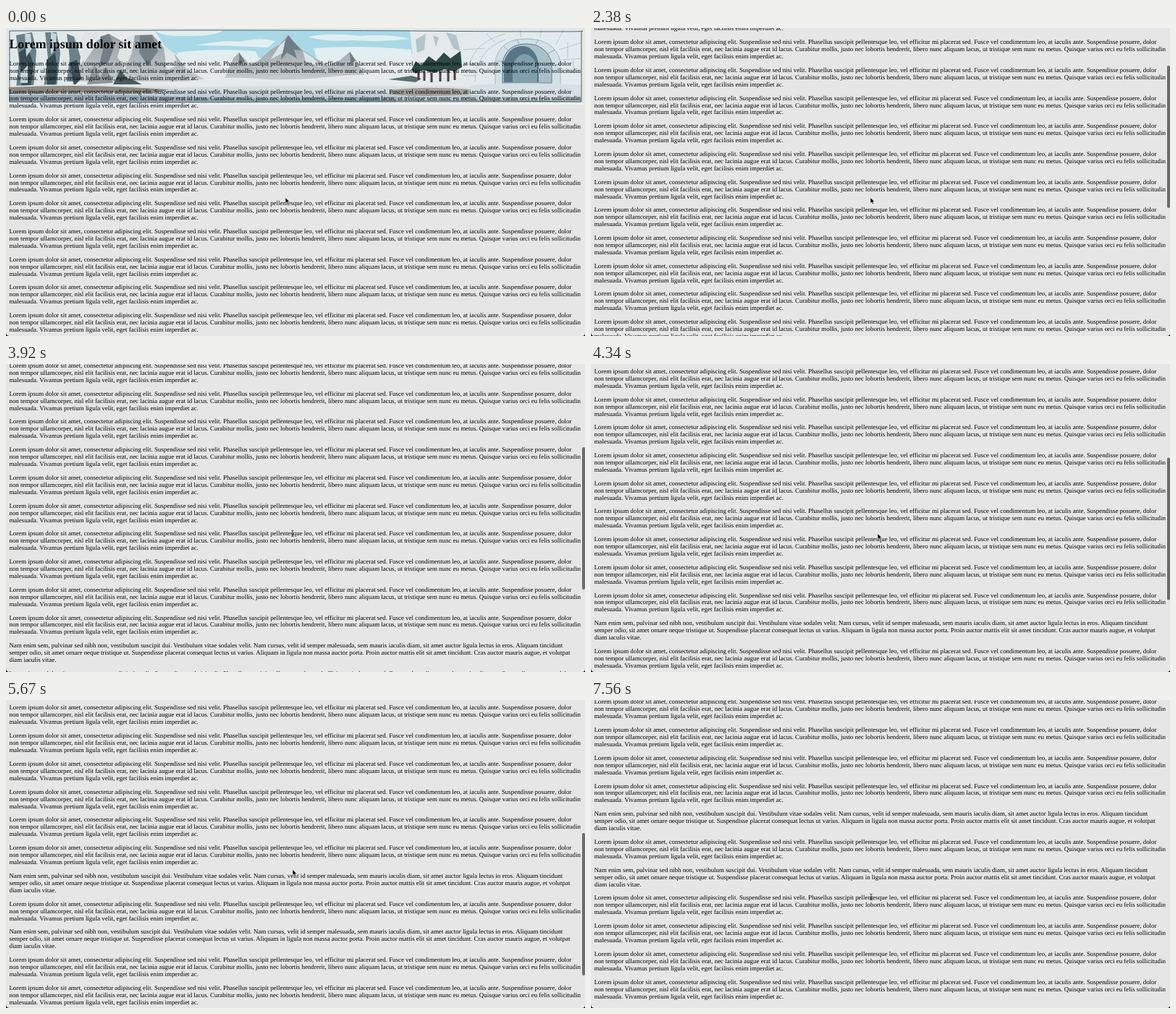
These frames come from a looping animation (800x426 px, 7630 ms). An HTML page:

```html
<!DOCTYPE html>
<html lang="la">
<head>
<meta charset="utf-8">
<title>Lorem ipsum</title>
<style>
html, body { margin: 0; width: 100%; height: 100%; overflow: hidden; background: #e6e6e6; }
#stage { position: relative; width: 800px; height: 426px; overflow: hidden; }
#stage svg { position: absolute; left: 0; top: 0; }
#scroll { position: absolute; left: 0; top: 0; width: 800px; height: 900px; }
#page {
  position: absolute; left: 0; top: 0; width: 1440px;
  transform: scale(.5556); transform-origin: 0 0;
  font: 16px/17.9px "Liberation Serif", Times, serif;
  text-rendering: geometricPrecision; white-space: pre; color: #000;
}
h1 { margin: 21.44px 8px; font-size: 32px; line-height: 37px; }
p { margin: 0 8px 15.98px; }
#thumb {
  position: absolute; left: 796px; top: 0; width: 4px; height: 197px;
  border-radius: 2px; background: #6c6c6c;
}
</style>
</head>
<body>
<div id="stage">
  <div id="scroll">
    <svg id="banner" width="800" height="110">
      <defs>
        <clipPath id="frame"><rect x="4" y="3" width="791" height="100"/></clipPath>
        <linearGradient id="shore" x2="0" y2="1">
          <stop stop-color="#dfe5e7"/><stop offset="1" stop-color="#aebdc5"/>
        </linearGradient>
        <linearGradient id="stone" x2="0" y2="1">
          <stop stop-color="#929ca2"/><stop offset="1" stop-color="#c6cccf"/>
        </linearGradient>
      </defs>
      <path d="M4 102H796V106H4Z" fill="#f3f5f5"/>
      <g clip-path="url(#frame)">
        <rect width="800" height="110" fill="#e6eaeb"/>
        <!-- sky and clouds -->
        <path d="M205 3H562V36Q520 44 480 40L300 42L240 40L220 26Z" fill="#a9d9e7"/>
        <g fill="#e2eef1">
          <path d="M205 3H300Q290 12 245 11Q215 12 205 3Z"/>
          <path d="M262 24Q300 16 325 19Q350 12 372 18L362 27Q310 24 262 24Z"/>
          <path d="M418 12Q450 6 490 11Q530 8 558 15Q520 20 480 17Q440 20 418 12Z"/>
          <path d="M236 34Q290 27 345 32L350 44H240Z"/>
          <path d="M425 28Q490 23 560 30V44H430Z"/>
        </g>
        <!-- mountains -->
        <path d="M95 62L125 18L142 8L160 18L178 10L202 9L218 27L232 35L250 57L280 74H90Z" fill="url(#stone)"/>
        <path d="M130 12L142 8L150 24L142 46L128 55L134 30ZM185 10H202L210 32L196 52L184 34Z" fill="#747f86"/>
        <path d="M108 5L128 6L124 24L108 48L100 30ZM160 18L178 10L174 34L164 58L154 40ZM218 27L232 35L238 51L222 59Z" fill="#dfe5e7"/>
        <path d="M300 74L314 42L322 34L338 52L350 44L366 30L378 23L390 10L398 19L410 31L425 40L444 52L462 44L475 33L486 48L500 74Z" fill="url(#stone)"/>
        <path d="M390 10L398 20L408 31L398 30L402 42L388 34L380 44L382 26ZM475 33L483 45L476 49ZM322 34L330 46L322 51Z" fill="#707d85"/>
        <path d="M378 24L386 17L382 35L366 43ZM410 32L424 41L436 54L414 46Z" fill="#dce3e6"/>
        <!-- snow field -->
        <path d="M230 76Q300 66 345 70T440 68T560 66V84H230Z" fill="#e6eaeb"/>
        <!-- left cliff and trees -->
        <path d="M4 3H98L105 34L90 70L80 82H4Z" fill="#e0e8ea"/>
        <path d="M14 10L36 6L42 32L38 82H14L18 46ZM54 6H70L75 34L70 82H52L58 42ZM84 8L94 12L103 40L98 74H84L88 42Z" fill="#6b8089"/>
        <path d="M18 34L30 26L38 50L34 82H22ZM56 44L68 34L71 58L68 82H57ZM88 48L98 44L104 70L94 80Z" fill="#3a4d55"/>
        <path d="M26 8L34 8L36 28L28 40ZM62 6L70 8L68 30L62 36ZM20 62L30 52V76H20Z" fill="#c5d6db"/>
        <path d="M112 78L122 50L130 68L138 54L148 76Z" fill="#8b959a"/>
        <path d="M150 74L158 58L166 68L178 73L188 78H148Z" fill="#4c5b60"/>
        <!-- shore -->
        <path d="M4 80Q120 75 240 82Q400 78 560 80T800 78V104H4Z" fill="url(#shore)"/>
        <path d="M4 82Q90 78 170 82L225 85L205 90Q100 88 4 91Z" fill="#8d8882"/>
        <path d="M4 93Q120 90 240 95T540 95V103H4Z" fill="#9aabb5"/>
        <path d="M530 86Q580 80 640 85V92Q580 96 530 92Z" fill="#a39f9a"/>
        <!-- right cliff and trees -->
        <path d="M558 3H660L650 60L632 80H556L570 54L562 38Z" fill="#e4e9eb"/>
        <path d="M566 16L580 8L578 30L568 34ZM608 6L622 10L628 32L618 28ZM590 10L598 13L594 26Z" fill="#b4c4cb"/>
        <path d="M528 71L560 66L574 70L566 75Z" fill="#5b706d"/>
        <path d="M560 58L566 46L574 52L584 39L594 46L605 34L614 42L628 32L630 54L620 60L606 57L592 62L576 58L566 63Z" fill="#2d4a46"/>
        <path d="M570 60V72M578 60V73M588 62V75M600 60V74M611 58V74M620 58V72" stroke="#4e3f3c" stroke-width="3"/>
        <!-- igloo -->
        <path d="M632 82Q628 16 672 3H800V82Z" fill="#e3eaed"/>
        <path d="M640 50Q650 18 690 8M648 74Q650 30 690 16M632 30L662 28M632 50L654 50M632 66L650 66M664 8L676 20M710 3L712 13M740 3L738 13M770 3L760 23M796 20L764 30M796 42L768 44M796 62L768 60M776 20V42M784 43V62" fill="none" stroke="#b6c6cd"/>
        <path d="M676 80V46Q682 15 718 15Q758 15 766 46V80Z" fill="#d3e0e5" stroke="#9fb4be"/>
        <path d="M686 76V48Q691 22 719 22Q746 22 754 48V76Z" fill="#a9c0cb" stroke="#5d7a88"/>
        <path d="M688 75V48Q694 25 715 25Q732 27 736 50V75Z" fill="#587688"/>
        <path d="M700 75V52Q706 36 718 36Q732 40 734 56V75Z" fill="#7f9fae"/>
        <path d="M678 46L688 46M688 26L696 33M706 16L710 24M736 16L731 24M758 30L748 36M765 50L753 52" stroke="#8fa7b2"/>
        <path d="M640 80Q700 73 796 79V94Q700 99 640 92Z" fill="#d6e0e4"/>
      </g>
      <path d="M5 102V4Q300 2 560 4T795 4V102Q600 100 400 102T5 102Z" fill="none" stroke="#4b6570"/>
    </svg>
    <div id="page"><h1>Lorem ipsum dolor sit amet</h1></div>
  </div>
  <div id="thumb"></div>
  <svg width="800" height="426">
    <path d="M0 421Q0 426 5 426H0ZM800 422Q800 426 796 426H800Z"/>
    <g id="cursor">
      <path id="arrow" d="M0 0V8L1.9 6.3L3.2 9.1L4.6 8.5L3.4 5.8H5.8Z" stroke="#fff" stroke-width=".6"/>
      <path id="beam" d="M-1.6 -4.2Q0 -4.2 0 -3Q0 -4.2 1.6 -4.2M0 -3V3.4M-1.6 4.2Q0 4.2 0 3Q0 4.2 1.6 4.2M-1 1.5H1" fill="none" stroke="#222" stroke-width=".8"/>
    </g>
  </svg>
</div>
<script>
const LOOP = 7630, PITCH = 38.71, TOP = 44.4;
const $ = id => document.getElementById(id);

const lorem = `Lorem ipsum dolor sit amet, consectetur adipiscing elit. Suspendisse sed nisi velit. Phasellus suscipit pellentesque leo, vel efficitur mi placerat sed. Fusce vel condimentum leo, at iaculis ante. Suspendisse posuere, dolor
non tempor ullamcorper, nisl elit facilisis erat, nec lacinia augue erat id lacus. Curabitur mollis, justo nec lobortis hendrerit, libero nunc aliquam lacus, ut tristique sem nunc eu metus. Quisque varius orci eu felis sollicitudin
malesuada. Vivamus pretium ligula velit, eget facilisis enim imperdiet ac.`;
const nam = `Nam enim sem, pulvinar sed nibh non, vestibulum suscipit dui. Vestibulum vitae sodales velit. Nam cursus, velit id semper malesuada, sem mauris iaculis diam, sit amet auctor ligula lectus in eros. Aliquam tincidunt
semper odio, sit amet ornare neque tristique ut. Suspendisse placerat consequat lectus ut varius. Aliquam in ligula non massa auctor porta. Proin auctor mattis elit sit amet tincidunt. Cras auctor mauris augue, et volutpat
diam iaculis vitae.`;

for (let i = 0; i < 22; i++) {
  const p = document.createElement('p');
  p.textContent = i === 15 || i === 17 ? nam : lorem;
  $('page').append(p);
}

// Scroll offset: time in ms, pixels
const keys = [[1780, 0], [2380, 107], [3130, 163], [3270, 163], [3920, 240.3],
              [4970, 314.1], [5670, 386.5], [6400, 472]];
const clamp = x => Math.min(1, Math.max(0, x));
const ramp = (t, a, b) => clamp((t - a) / (b - a));
const smooth = x => x * x * (3 - 2 * x);
const rate = i => keys[i + 1] && keys[i] ? (keys[i + 1][1] - keys[i][1]) / (keys[i + 1][0] - keys[i][0]) : 0;

// Harmonic mean of the neighbouring rates keeps the curve monotone
function slope(i) {
  const a = rate(i - 1), b = rate(i);
  return a && b ? 2 * a * b / (a + b) : 0;
}

function scrollAt(t) {
  const i = keys.findIndex(k => k[0] > t) - 1;
  if (i === -1) return 0;
  if (i < -1) return keys[keys.length - 1][1];
  const [t0, y0] = keys[i], [t1, y1] = keys[i + 1];
  const d = t1 - t0, u = (t - t0) / d, v = 1 - u;
  return y0 + (y1 - y0) * smooth(u) + d * u * v * (v * slope(i) - u * slope(i + 1));
}

function draw(t) {
  const s = scrollAt(t);
  $('scroll').style.transform = `translateY(${-s}px)`;
  $('thumb').style.transform = `translateY(${1.5 + .472 * s}px)`;
  $('thumb').style.opacity = ramp(t, 1780, 1850) * (1 - ramp(t, 6850, 7070));

  const back = smooth(ramp(t, 6450, 7000));
  const x = 386 + 10 * smooth(ramp(t, 3290, 3600)) - 9 * back;
  const y = 234.5 + 38 * back;
  const inPara = (y + s - TOP) % PITCH;
  const overText = inPara < 19.9;
  $('cursor').setAttribute('transform', `translate(${x} ${y})`);
  $('arrow').style.display = overText ? 'none' : '';
  $('beam').style.display = overText ? '' : 'none';
}

const start = performance.now();
function tick() {
  draw((performance.now() - start) % LOOP);
  requestAnimationFrame(tick);
}
draw(0);
requestAnimationFrame(tick);
</script>
</body>
</html>
```
